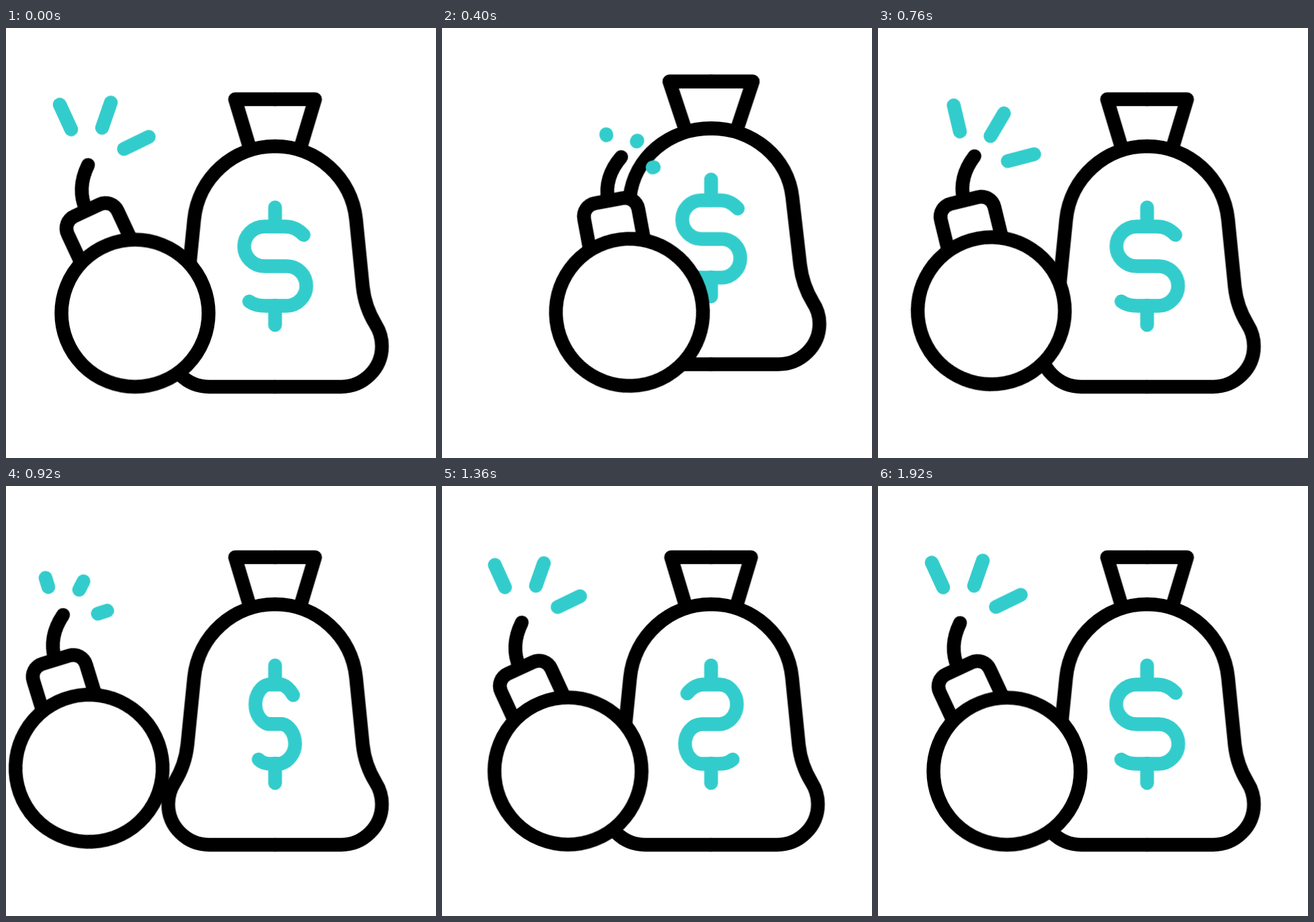
Recreate the animation shown at these times as an HTML page without scripts. Size 640 by 640 pixels, loop 2 s.

```html
<!DOCTYPE html>
<html lang="en">
<head>
<meta charset="utf-8">
<title>Bomb and money bag</title>
<style>
html, body { margin: 0; width: 100%; height: 100%; overflow: hidden; background: #fff; }
svg { display: block; width: 100vw; height: 100vh; }
svg * {
  animation-duration: 2s;
  animation-iteration-count: infinite;
  animation-timing-function: cubic-bezier(.333, 0, .667, 1);
}
.ink { fill: none; stroke: #000; stroke-width: 20.5; stroke-linecap: round; stroke-linejoin: round; }
.teal { stroke: #3cc; }
.solid { fill: #fff; }

/* bag: hop, land squashed, recover */
.hop { transform-origin: 0 534px; animation-name: hop; }
@keyframes hop {
  0%, 4%, 26%, 100% { transform: none; }
  14% { transform: translateY(-68px) scaleY(1.007); }
}
.half { animation-name: squash; }
@keyframes squash {
  0%, 14%, 37%, 100% { d: path("M0 106L59.5 106L38.5 176M0 176C62.2 176 114.3 223.1 120.5 285L130.5 385C132.5 404 138.5 423 149.5 441C155.5 450.5 159 462 159 473.5C159 507 131.5 534 98 534L0 534"); }
  26% { d: path("M0 123L64.5 123L39.5 192M0 192C62.5 192 115 232 121.5 288L134.5 388C137 407 142.5 425 153.5 443C160 452 163.5 463 163.5 474C163.5 507 136 534 102 534L0 534"); }
}

/* dollar sign: hops with the bag, then flips over and back */
.stem { animation-name: stem; }
@keyframes stem {
  0%, 4%, 37%, 100% { d: path("M0 267L0 295M0 413L0 442"); }
  14% { d: path("M0 177.5L0 214M0 332L0 359"); }
  26% { d: path("M0 272.5L0 297M0 409L0 439"); }
}
.ess { transform-origin: 0 354.5px; vector-effect: non-scaling-stroke; animation-name: lift, flip; }
@keyframes lift {
  0%, 4%, 37%, 100% { transform: none; }
  14% { transform: translateY(-81px) scale(.815, 1); }
  26% { transform: translateY(-1px) scale(1.05, .95); }
}
@keyframes flip {
  0%, 37%, 96%, 100% { d: path("M42.5 308C35 300 26 295.5 15 295.5L-16 295.5C-32.5 295.5 -46 309 -46 325C-46 341 -32.5 354.5 -16 354.5L17 354.5C33 354.5 46.5 367 46.5 384C46.5 400 33 413.5 17 413.5L-14 413.5C-24 413.5 -33 411 -38.5 407"); }
  54%, 84% { d: path("M14 314C12 306 10 300 6 295.5L-5 295.5C-11 299 -15.5 311 -15.5 325C-15.5 338 -12 348 -7 354L6 354C11 358 16 370 16 384C16 396 9 408 0 413.5L0 413.5C-6 413.5 -11 411 -13 407"); }
  72% { d: path("M-42.5 308C-35 300 -26 295.5 -15 295.5L16 295.5C32.5 295.5 46 309 46 325C46 341 32.5 354.5 16 354.5L-17 354.5C-33 354.5 -46.5 367 -46.5 384C-46.5 400 -33 413.5 -17 413.5L14 413.5C24 413.5 33 411 38.5 407"); }
}

/* bomb: slides right, left and home while tilting once */
.slide { animation-name: slide; }
@keyframes slide {
  0%, 4%, 72%, 100% { transform: none; }
  22% { transform: translate(100.3px, 0); }
  47% { transform: translate(-63.5px, -4px); }
}
.tilt { transform-origin: 192px 384.5px; animation-name: tilt; }
@keyframes tilt {
  0%, 4%, 72%, 100% { transform: rotate(0deg); }
  22% { transform: rotate(15deg); }
}
.sparks { animation-name: sink; }
@keyframes sink {
  0%, 4%, 72%, 100% { transform: translate(0, 0); }
  22% { transform: translate(-4.3px, 28px); }
}
.sparks path { animation-name: flash; }
@keyframes flash {
  0%, 4%, 37%, 72%, 100% { stroke-dasharray: 1 2; }
  22%, 52% { stroke-dasharray: .01 2; }
}
</style>
</head>
<body>
<svg viewBox="0 0 640 640">
  <g class="ink" transform="translate(400.5 0)">
    <g class="hop">
      <path class="half"/>
      <g transform="scale(-1 1)"><path class="half"/></g>
    </g>
    <g class="teal">
      <path class="stem"/>
      <path class="ess"/>
    </g>
  </g>
  <g class="slide">
    <g class="tilt">
      <g class="ink" transform="translate(192 424.5)">
        <g transform="rotate(-25)">
          <path class="solid" d="M-41 -100V-149a20 20 0 0 1 20 -20h42a20 20 0 0 1 20 20V-100"/>
          <path d="M-1 -170Q-.5 -205 30 -229.5"/>
        </g>
        <circle class="solid" r="109.5"/>
        <g class="sparks teal">
          <path pathLength="1" d="M-95 -273.5L-112 -310.5"/>
          <path pathLength="1" d="M-49 -276L-36 -313.5"/>
          <path pathLength="1" d="M-16.5 -244.5L20.5 -262.5"/>
        </g>
      </g>
    </g>
  </g>
</svg>
</body>
</html>
```
